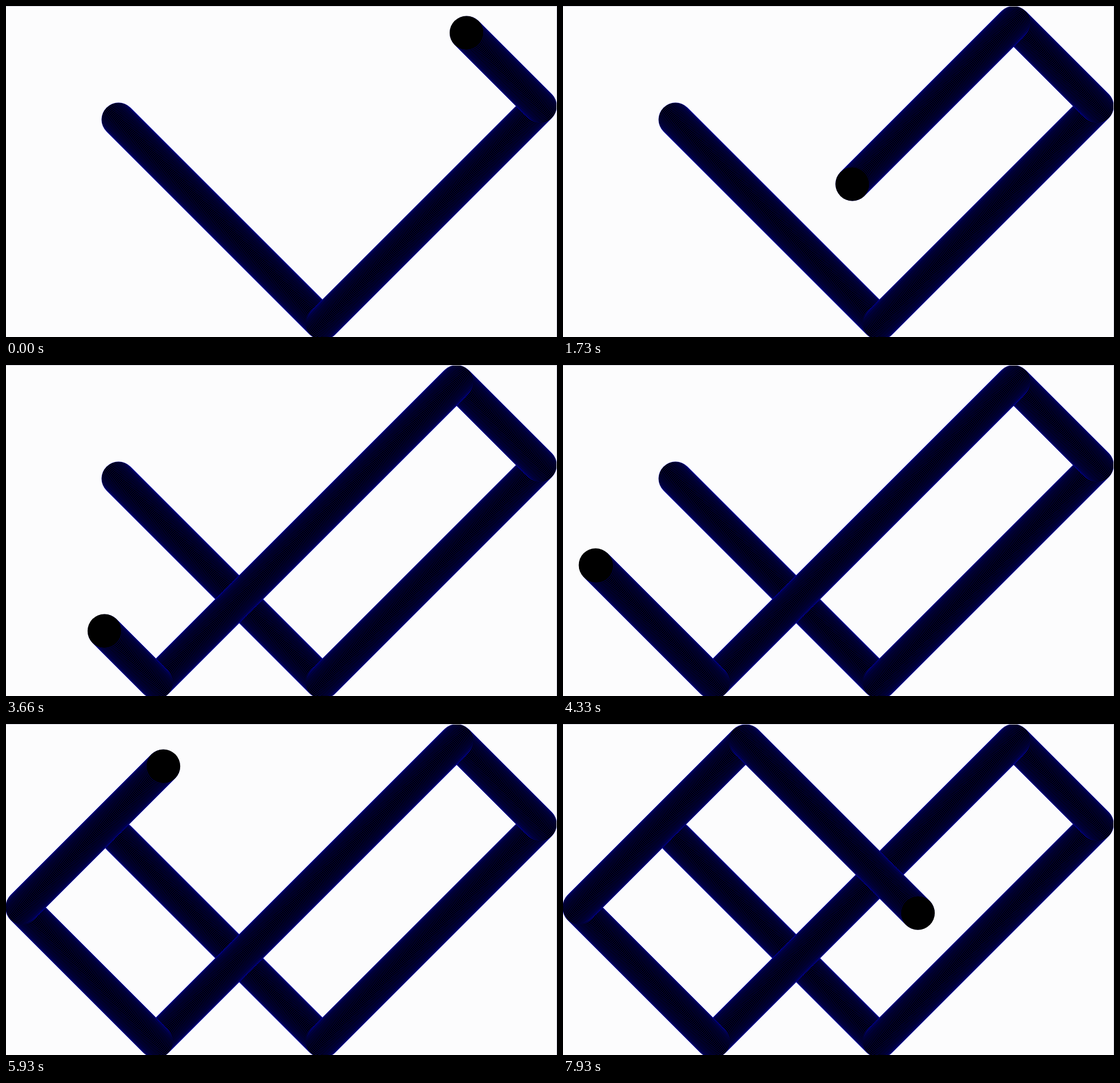
Recreate the animation shown at these times as an HTML page with a canvas. Size 965 by 580 pixels, loop 8 s.

```html
<!DOCTYPE html>
<html lang="en">
<head>
<meta charset="utf-8">
<title>Bouncing ball trail</title>
<style>
  html, body { margin: 0; width: 100%; height: 100%; overflow: hidden; background: #fcfcfd; }
  canvas { display: block; }
</style>
</head>
<body>
<canvas id="stage" width="965" height="580"></canvas>
<script>
const ctx = document.getElementById('stage').getContext('2d');
const LOOP = 8000, TICK = 200 / 3;
const RADIUS = 29.5, SPACING = 2;
const HEAD_START = 866.5, SPEED = 11.53; // pixels per axis, and per tick

// Position after travelling between two walls, reversing at each one
function bounce(start, travelled, low, high) {
  const range = high - low;
  const phase = (start - low + travelled) % (2 * range);
  return low + range - Math.abs(range - phase);
}

function disc(travelled) {
  const x = bounce(197, travelled, 28, 935);
  const y = bounce(199, travelled, 29.6, 556.2);
  ctx.beginPath();
  ctx.arc(x, y, RADIUS, 0, Math.PI * 2);
  ctx.fill();
}

function draw(ms) {
  const tick = Math.floor((ms + 9.99) / TICK);
  const head = HEAD_START + SPEED * tick;

  ctx.fillStyle = '#fcfcfd';
  ctx.fillRect(0, 0, 965, 580);

  ctx.fillStyle = '#000';
  ctx.strokeStyle = '#00f';
  ctx.lineWidth = 0.4;
  for (let d = 0; d < head; d += SPACING) {
    disc(d);
    ctx.stroke();
  }
  disc(head);

  ctx.fillStyle = '#d2d2de';
  ctx.fillRect(0, 0, 965, 1);
  ctx.fillRect(964, 0, 1, 580);
}

function animate() {
  draw(Math.floor(performance.now() % LOOP / 10) * 10);
  requestAnimationFrame(animate);
}
animate();
</script>
</body>
</html>
```
